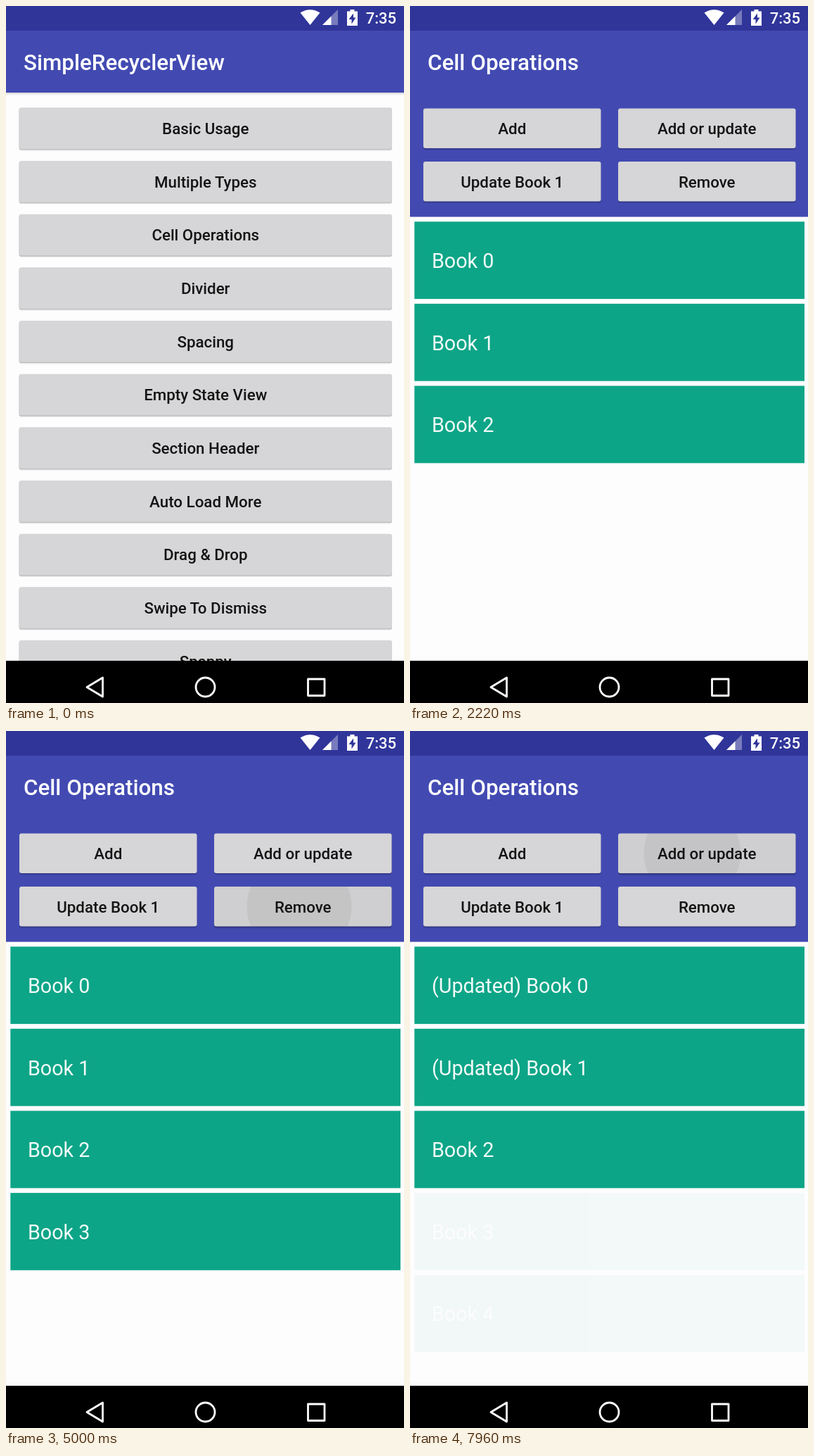
Write an HTML page that moves like this. It is 566 px wide and 990 px high and loops after 8 s.

```html
<!DOCTYPE html>
<html lang="en">
<head>
<meta charset="utf-8">
<style>
  html, body { margin: 0; width: 100%; height: 100%; overflow: hidden; background: #000; }
  svg { display: block; width: 100%; height: 100%; }
  text { font-family: Roboto, sans-serif; }
  .title { font-size: 31.4px; font-weight: 500; fill: #fff; }
  .label { font-size: 22.3px; font-weight: 500; fill: #141414; text-anchor: middle; }
  .book { font-size: 28.7px; fill: #f4fbf9; }
  .clock { font-size: 22px; font-weight: 500; fill: #fff; text-anchor: end; }
</style>
</head>
<body>
<svg id="stage" viewBox="0 0 566 990">
  <defs>
    <linearGradient id="drop" x2="0" y2="1">
      <stop offset="0" stop-opacity=".16"/>
      <stop offset="1" stop-opacity="0"/>
    </linearGradient>
  </defs>
  <g id="home">
    <rect width="566" height="990" fill="#fefdfe"/>
    <rect width="566" height="123" fill="#424ab2"/>
    <rect y="123" width="566" height="4" fill="url(#drop)"/>
    <rect width="566" height="35" fill="#303599"/>
    <text class="title" x="25" y="91">SimpleRecyclerView</text>
    <g id="menu"></g>
    <rect y="930" width="566" height="60"/>
  </g>
  <g id="page">
    <rect width="566" height="990" fill="#fefdfe"/>
    <rect width="566" height="299.5" fill="#424ab2"/>
    <rect width="566" height="35" fill="#303599"/>
    <text class="title" x="25" y="91">Cell Operations</text>
    <g id="actions"></g>
    <g id="books"></g>
    <rect y="930" width="566" height="60"/>
  </g>
  <g id="system" fill="#fff">
    <path d="M432.5 27 L418.5 9.5 Q432.5 1 446.5 9.5 Z"/>
    <path d="M450 27 L472 5 V27 Z" opacity=".35"/>
    <path d="M450 27 L462.5 14.5 V27 Z"/>
    <path d="M485 7.5 H489.5 V5 H495.5 V7.5 H500 V28 H485 Z"/>
    <path d="M494 10.5 L487.5 19 H491.5 V25.5 L497.5 16.5 H494 Z" fill="#303599"/>
    <text class="clock" x="555" y="25">7:35</text>
    <g fill="none" stroke="#fff" stroke-width="2.8" stroke-linejoin="round">
      <path d="M115 967.5 L137.5 954 V981 Z"/>
      <circle cx="283.5" cy="967.5" r="13.5"/>
      <rect x="429.5" y="956" width="23.5" height="23.5"/>
    </g>
  </g>
</svg>
<script>
const LOOP = 8000, OPEN = 1395;
const NS = 'http://www.w3.org/2000/svg';
const $ = id => document.getElementById(id);
const clamp = v => Math.min(1, Math.max(0, v));
const smooth = v => (1 - Math.cos(Math.PI * clamp(v))) / 2;

function add(parent, tag, attrs, text) {
  const el = document.createElementNS(NS, tag);
  set(el, attrs);
  if (text) el.textContent = text;
  return parent.appendChild(el);
}

function set(el, attrs) {
  for (const k in attrs) el.setAttribute(k, attrs[k]);
}

let clipCount = 0;

function button(parent, label, x, y, width, height, base) {
  const box = { x, y, width, height, rx: 3 };
  const cx = x + width / 2, cy = y + height / 2;
  const clip = 'clip' + clipCount++;
  const g = add(parent, 'g', {});
  add(add(g, 'clipPath', { id: clip }), 'rect', box);
  const lift = add(g, 'rect', { ...box, y: y + 4, opacity: 0 });
  add(g, 'rect', { ...box, y: y + 2.5, opacity: .1 });
  add(g, 'rect', { ...box, y: y + 1.3, opacity: .16 });
  add(g, 'rect', { ...box, fill: '#d6d5d7' });
  const shade = add(g, 'rect', { ...box, opacity: 0 });
  const wave = add(g, 'circle', { cy, r: 0, opacity: 0, 'clip-path': `url(#${clip})` });
  add(g, 'text', { class: 'label', x: cx, y: base }, label);
  return { cx, lift, shade, wave };
}

const menu = ['Basic Usage', 'Multiple Types', 'Cell Operations', 'Divider', 'Spacing',
  'Empty State View', 'Section Header', 'Auto Load More', 'Drag & Drop',
  'Swipe To Dismiss', 'Snappy'].map((label, i) =>
  button($('menu'), label, 18.5, 144.3 + 75.67 * i, 530.5, 58.7, 182 + 75.65 * i));

const actions = ['Add', 'Add or update', 'Update Book 1', 'Remove'].map((label, i) => {
  const row = i >> 1;
  return button($('actions'), label, i % 2 ? 296 : 19, 145.5 + 75.6 * row, 252.5, 56.5, 182 + 75.6 * row);
});

// Each tap: button, finger x, press time, release time
const taps = [
  [menu[2], 300, 1200, 1320],
  [actions[0], 138, 2940, 3055],
  [actions[0], 138, 3650, 3760],
  [actions[3], 410, 4600, 4710],
  [actions[3], 410, 5180, 5290],
  [actions[2], 150, 6290, 6400],
  [actions[1], 378, 7590, 7690]
];

const ADD = 120, CHANGE = 250;

// Each cell: row, label, fade-in start, fade-out start, fade length
const cells = [
  [0, 'Book 0', -999, 7694, CHANGE],
  [0, '(Updated) Book 0', 7694, 1e5, CHANGE],
  [1, 'Book 1', -999, 6410, CHANGE],
  [1, '(Updated) Book 1', 6410, 1e5, CHANGE],
  [2, 'Book 2', -999, 1e5, ADD],
  [3, 'Book 3', 3072, 5300, ADD],
  [4, 'Book 4', 3775, 4720, ADD],
  [3, 'Book 3', 7944, 1e5, ADD],
  [4, 'Book 4', 7944, 1e5, ADD]
].map(([row, label, start, end, span]) => {
  const g = add($('books'), 'g', {});
  add(g, 'rect', { x: 6.3, y: 306.3 + 116.6 * row, width: 554.7, height: 109.8, fill: '#0da587' });
  add(g, 'text', { class: 'book', x: 31, y: 372 + 116.6 * row }, label);
  return { g, start, end, span };
});

function ripple([btn, x, press, release], t) {
  const grow = clamp((t - press) / 700);
  const power = clamp((t - press) / 80) * (1 - clamp((t - release) / 600));
  set(btn.lift, { opacity: .12 * power });
  set(btn.shade, { opacity: .06 * power });
  set(btn.wave, { cx: x + (btn.cx - x) * grow, r: 130 * grow, opacity: .1 * power });
}

function render(t) {
  const moved = (1 - clamp((t - OPEN) / 350)) ** 5;
  const alpha = 1 - (1 - clamp((t - OPEN) / 200)) ** 4;
  set($('page'), { transform: `translate(0 ${79.2 * moved})`, opacity: alpha });

  [...menu, ...actions].forEach(btn => {
    for (const el of [btn.lift, btn.shade, btn.wave]) set(el, { opacity: 0 });
  });
  taps.filter(tap => t >= tap[2] && t < tap[3] + 600).forEach(tap => ripple(tap, t));

  for (const { g, start, end, span } of cells) {
    set(g, { opacity: smooth((t - start) / span) - smooth((t - end) / span) });
  }
}

const begin = performance.now();
function tick() {
  render((performance.now() - begin) % LOOP);
  requestAnimationFrame(tick);
}
tick();
</script>
</body>
</html>
```
